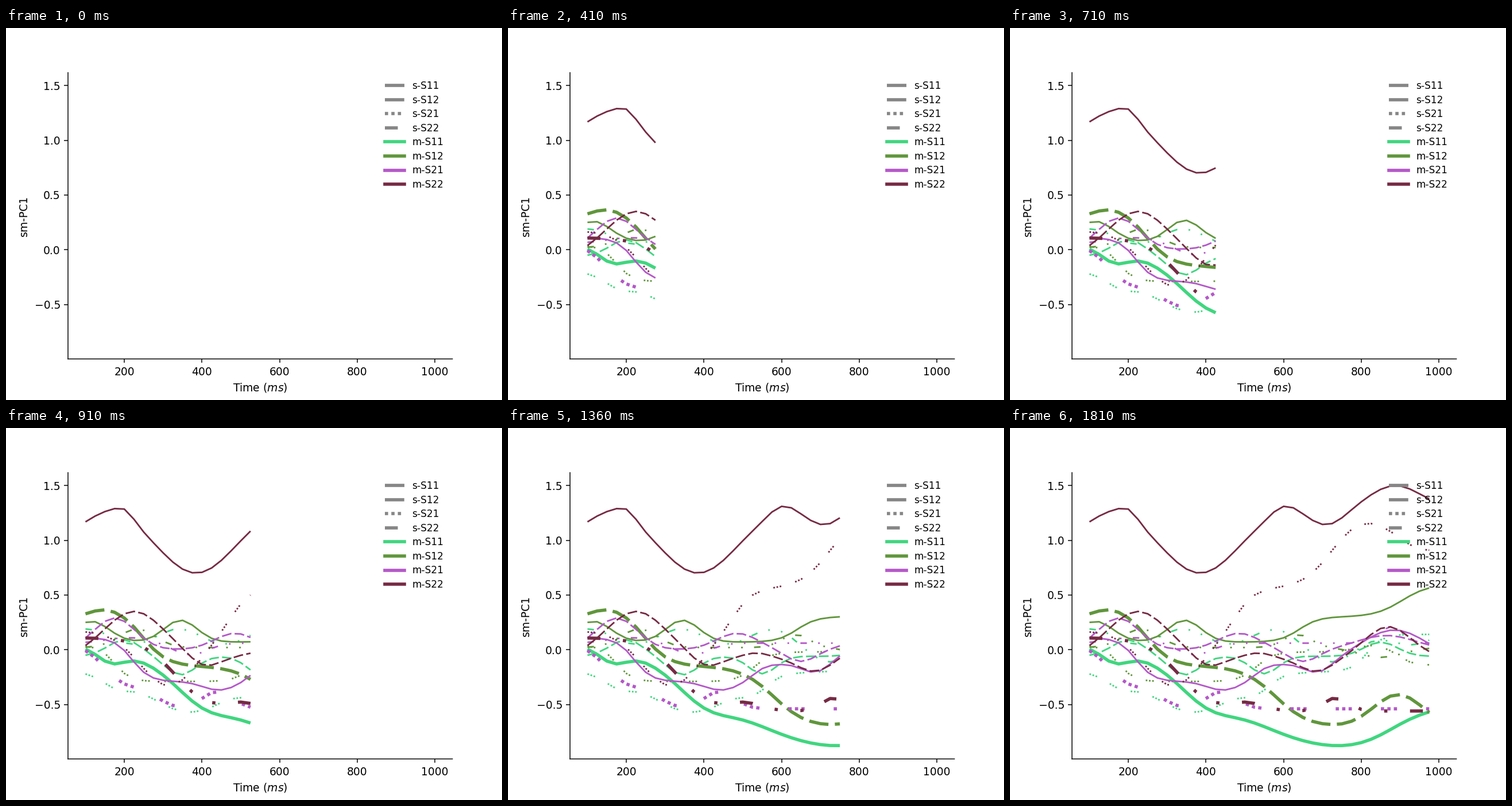
These frames come from a looping animation (864x648 px, 1860 ms). A matplotlib script:

```python
import matplotlib.pyplot as plt
import numpy as np
from matplotlib.animation import FuncAnimation
from matplotlib.lines import Line2D

LOOP, TICK = 1860, 10          # ms
HOLD, STEP = 60, 50            # pause before drawing, ms per new sample
THIN, THICK = 1.5, 3

NAMES = ["S11", "S12", "S21", "S22"]
COLORS = ["#40d67f", "#60963c", "#b458c8", "#762a44"]
STYLES = [(0, ()),
          (0, (6, 2)),
          (0, (1, 1, 1, 1, 1, 9)),
          (0, (4, 7, 1, 7, 1, 7))]

t = np.arange(100, 1000, 25)


def bump(size, at, width):
    return size * np.exp(-((t - at) / width) ** 2)


def ramp(size, at, width):
    return size / 2 * (1 + np.tanh((t - at) / width))


def wave(size, period, peak):
    return size * np.cos(2 * np.pi * (t - peak) / period)


fig, ax = plt.subplots(figsize=(6.4, 4.8), dpi=135)
fig.subplots_adjust(bottom=0.1104)
ax.set(xlim=(55, 1045), ylim=(-0.998, 1.618))
ax.set_xlabel("Time ($ms$)")
ax.set_ylabel("sm-PC1", labelpad=4.5)
ax.spines[["top", "right"]].set_visible(False)
ax.spines[["left", "bottom"]].set_snap(False)

curves = []


def add_family(m, *family):
    """Four curves of one colour, one per line style."""
    for s, y in enumerate(family):
        line, = ax.plot([], [], color=COLORS[m], ls=STYLES[s],
                        lw=THICK if s == m else THIN)
        curves.append((line, y))


add_family(
    0,
    -.425 + wave(.455, 1340, 80) + bump(-.12, 165, 50) + bump(-.14, 400, 90)
    + bump(.1, 930, 100),
    -.06 + bump(.15, 200, 60) + bump(-.17, 345, 55) + bump(-.16, 550, 50)
    + bump(.13, 850, 60),
    -.2 + bump(-.09, 180, 50) + bump(-.37, 370, 150) + bump(-.1, 530, 45)
    + ramp(.34, 815, 40),
    .12 + wave(.07, 237, 104) + bump(-.2, 755, 95))
add_family(
    1,
    .07 + bump(.19, 115, 65) + bump(.2, 345, 60) + ramp(.23, 640, 50)
    + ramp(.3, 905, 70),
    .4 + bump(-.07, 90, 40) + ramp(-.55, 245, 65) + ramp(-.56, 580, 85)
    + bump(.3, 895, 90),
    .04 + ramp(-.33, 175, 40) + ramp(.27, 530, 45) + bump(.06, 830, 60)
    + ramp(-.12, 900, 35),
    .02 + bump(.17, 232, 65) + bump(.12, 635, 50) + bump(-.09, 850, 80))
add_family(
    2,
    .11 + ramp(-.4, 220, 45) + bump(-.08, 445, 60) + ramp(.16, 530, 35)
    + bump(-.1, 690, 50) + bump(.31, 885, 125),
    bump(.29, 175, 75) + bump(.15, 485, 75) + bump(-.11, 650, 55)
    + bump(.13, 865, 105),
    -.54 + bump(.55, 80, 110) + bump(.12, 250, 60) + bump(.16, 440, 55),
    .06 + bump(.05, 210, 80) + bump(-.11, 370, 60) + bump(.15, 875, 45))
add_family(
    3,
    1.3 + bump(-.13, 90, 40) + bump(.09, 200, 35) + bump(-.6, 385, 140)
    + bump(.075, 600, 45) + bump(-.16, 712, 65) + bump(.2, 888, 90),
    -.08 + bump(.43, 225, 110) + bump(-.09, 405, 50) + bump(.05, 535, 50)
    + bump(-.12, 685, 60) + bump(.29, 870, 85),
    .17 + bump(-.5, 315, 105) + ramp(.39, 480, 50) + ramp(.7, 725, 75)
    + bump(-.35, 970, 110),
    .11 + ramp(-.67, 330, 85) + bump(.07, 505, 60) + bump(.12, 735, 45))

handles = [Line2D([], [], color="#868686", lw=THICK, ls=ls, label=f"s-{n}")
           for n, ls in zip(NAMES, STYLES)]
handles += [Line2D([], [], color=c, lw=THICK, label=f"m-{n}")
            for n, c in zip(NAMES, COLORS)]
ax.legend(handles=handles, loc="upper right", bbox_to_anchor=(1, 1.002),
          fontsize=9, labelspacing=0.39, frameon=False)


def draw(i):
    n = 1 + max(0, (i * TICK - HOLD) // STEP)
    for line, y in curves:
        line.set_data(t[:n], y[:n])
    return [line for line, _ in curves]


anim = FuncAnimation(fig, draw, frames=LOOP // TICK, interval=TICK,
                     repeat=True, repeat_delay=0)
plt.show()
```
